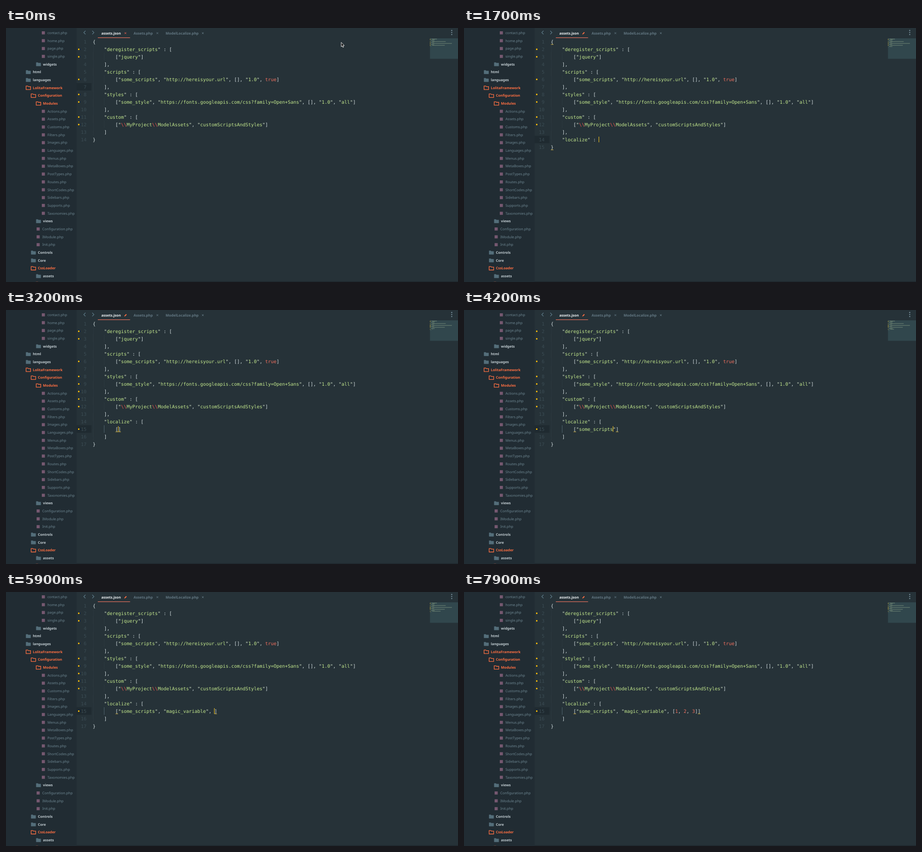
An HTML page that plays this animation: 960 by 540 pixels, repeating every 8000 ms.

```html
<!DOCTYPE html>
<html lang="en">
<head>
<meta charset="utf-8">
<title>Editor</title>
<style>
html, body { margin: 0; width: 100%; height: 100%; overflow: hidden; background: #263238; }
svg { display: block; width: 960px; height: 540px; }
text { white-space: pre; text-rendering: geometricPrecision; }
.ui { font: 500 7.5px "Noto Sans", "Open Sans", sans-serif; fill: #6d8691; }
.bold { font-weight: 700; font-size: 7.4px; }
.folder { fill: #c3ced3; }
.open { fill: #ff7043; }
.code { font: 9.97px "DejaVu Sans Mono", monospace; fill: #d5e0e2; }
.num { fill: #3b4c54; text-anchor: end; }
.q { fill: #d9e8d0; }
.s { fill: #c3e88d; }
.e { fill: #f0574f; }
.n { fill: #f2705f; }
</style>
</head>
<body>
<svg viewBox="0 0 960 540">
  <rect width="960" height="540" fill="#263238"/>
  <rect width="150" height="540" fill="#212c33"/>
  <rect x="150" y="538" width="810" height="2" fill="#202a30"/>
  <g id="side"></g>
  <g id="tabs"></g>
  <g id="map"></g>
  <g id="page"></g>
  <rect id="caret" width="1" height="12" fill="#ffcc22"/>
  <path id="mouse" d="M712 30.5v9.3l2.1-1.9 1.4 3.3 1.6-.7-1.4-3.2h2.8z" fill="#111" stroke="#fff" stroke-width=".9"/>
</svg>
<script>
const LOOP = 8000, CW = 6.002, X0 = 184.3, TOP = 21, LH = 16;
const $ = id => document.getElementById(id);
const rect = (x, y, w, h, fill) => `<rect x="${x}" y="${y}" width="${w}" height="${h}" fill="${fill}"/>`;
const text = (x, y, cls, str) => `<text x="${x}" y="${y}" class="${cls}">${str}</text>`;
const line = (d, color, w = 1) => `<path d="${d}" fill="none" stroke="${color}" stroke-width="${w}"/>`;

// Sidebar: depth digit, kind (f file, d folder, o open folder), label
const tree = `4f contact|4f home|4f page|4f single|2d widgets|0d html|0d languages|0o LolitaFramework
|1o Configuration|2o Modules|3f Actions|3f Assets|3f Customs|3f Filters|3f Images|3f Languages|3f Menus
|3f MetaBoxes|3f PostTypes|3f Routes|3f ShortCodes|3f Sidebars|3f Supports|3f Taxonomies|2d views
|2f Configuration|2f IModule|2f Init|1d Controls|1d Core|1o CssLoader|2d assets|2o classes`
  .replace(/\n/g, '').split('|');

function treeRow(item, i) {
  const depth = +item[0], kind = item[1], name = item.slice(3), y = 10 + 16.68 * i;
  if (kind === 'f') {
    const x = depth === 2 ? 77 : 88;
    return rect(x - 12, y - 3, 6.6, 6.6, '#755870') + text(x, y + 2.9, 'ui', name + '.php');
  }
  const x = 42 + 10.8 * depth, open = kind === 'o';
  const shape = `M${x + .6} ${y - 3.3}h3.6l1.2 1.2h4.8v6.2h-9.6z`;
  const icon = open ? line(shape, '#ff7043', 1.3)
    : `<path d="${shape}" fill="#546e7a" stroke="#546e7a" stroke-width=".7"/>`;
  return icon + text(x + 15, y + 3, 'ui bold ' + (open ? 'open' : 'folder'), name);
}
$('side').innerHTML = tree.map(treeRow).join('');

const cross = (x, color) => line(`M${x - 1.8} 9.2l3.6 3.6m0-3.6l-3.6 3.6`, color, 1);
function drawTabs(dirty) {
  const tab = (x, name, color) =>
    `<text x="${x}" y="13.5" class="ui bold" style="fill:${color};font-size:7.55px">${name}</text>`;
  const mark = dirty
    ? '<path d="M251.2 13.8l.5-1.9 3.3-3.3 1.4 1.4-3.3 3.3z" fill="#ff7043"/>'
    : cross(253.6, '#f0604f');
  $('tabs').innerHTML = line('M168.8 6l-3.6 3.7 3.6 3.7M183.2 6l3.6 3.7-3.6 3.7', '#607d8b', 1.2)
    + tab(202.5, 'assets.json', '#eef3f4') + mark
    + tab(271, 'Assets.php', '#637883') + cross(321.5, '#637883')
    + tab(339, 'ModelLocalize.php', '#637883') + cross(418, '#637883')
    + rect(195, 20, 68.5, 1.2, '#e5705c')
    + [5.3, 9.6, 13.9].map(y => `<circle cx="946.7" cy="${y}" r="1.2" fill="#78909c"/>`).join('');
}

// Editing session
let doc = String.raw`{
    "deregister_scripts" : [
        ["jquery"]
    ],
    "scripts" : [
        ["some_scripts", "http://hereisyour.url", [], "1.0", true]
    ],
    "styles" : [
        ["some_style", "https://fonts.googleapis.com/css?family=Open+Sans", [], "1.0", "all"]
    ],
    "custom" : [
        ["\\MyProject\\ModelAssets", "customScriptsAndStyles"]
    ]
}`;
let pos = 0;
const steps = [];
const push = t => steps.push({ t, doc, pos });
function goto(t, n) {
  const rows = doc.split('\n');
  pos = rows.slice(0, n - 1).join('\n').length + 1 + Math.min(6, rows[n - 1].length);
  push(t);
}
function key(t, str, move = str.length) {
  doc = doc.slice(0, pos) + str + doc.slice(pos);
  pos += move;
  push(t);
}
const type = (t, gap, str) => [...str].forEach((c, i) => key(t + gap * i, c));
const pair = (t, str) => key(t, str, 1);
const skip = t => key(t, '', 1);

goto(0, 7);
for (let n = 8; n <= 13; n++) goto(200 + (n - 8) * 50, n);
key(550, ',');
key(700, '\n    ');
pair(800, '""');
type(850, 60, 'localize');
skip(1350);
type(1450, 100, ' : ');
pair(2000, '[]');
key(2400, '\n        \n    ', 9);
pair(3000, '[]');
pair(3300, '""');
type(3380, 65, 'some_scripts');
skip(4270);
type(4350, 70, ', ');
pair(4490, '""');
type(4560, 70, 'magic');
type(5040, 55, '_variable');
skip(5580);
type(5650, 100, ', ');
pair(6150, '[]');
key(6400, '1');
type(6600, 100, ', ');
key(6850, '2');
type(7000, 100, ', ');
key(7250, '3');
skip(7400);

const blinkOff = [[0, 200], [2600, 2850], [4950, 5040], [7800, 8000]];

const span = (cls, str) => `<tspan class="${cls}">${str}</tspan>`;
const paint = row => row.replace(/"([^"]*)"|true|\d/g, (all, body) => {
  if (body === undefined) return span('n', all);
  const inner = body.split(/(\\+)/).map(p => p && span(p[0] === '\\' ? 'e' : 's', p)).join('');
  return span('q', '"') + inner + span('q', '"');
});

// Positions of the bracket pair around the caret
function enclosing(src, at) {
  const scan = (i, dir, up, down) => {
    for (let depth = 0; i >= 0 && i < src.length; i += dir) {
      if (up.includes(src[i])) depth++;
      else if (down.includes(src[i]) && depth-- === 0) return i;
    }
  };
  return [scan(at - 1, -1, ']}', '[{'), scan(at, 1, '[{', ']}')];
}
function place(src, at) {
  const rows = src.slice(0, at).split('\n');
  return { row: rows.length - 1, col: rows.at(-1).length };
}
const colX = col => X0 + col * CW;
const indent = row => row.search(/\S|$/);

function drawPage(step, linted) {
  const rows = step.doc.split('\n'), here = place(step.doc, step.pos);
  const marks = [2, 3, 6, 8, 9, 11, 12].concat(linted ? [10, 15] : []);
  let out = rect(150, TOP + LH * here.row, 31.5, LH, '#1f2a30');
  let map = rect(900.5, 22, 59.5, 43.5, '#31474d');
  rows.forEach((row, i) => {
    const y = TOP + LH * i, pad = indent(row), mapY = 21.8 + 1.333 * i;
    for (let c = 0; c < pad; c += 4) {
      const active = c === 4 && i === here.row;
      const x = Math.round(colX(c)) + (c ? .5 : 1.5);
      out += active ? line(`M${x} ${y}v${LH}`, '#4c626b')
        : `<path d="M${x} ${y}v${LH}" stroke="#303e45" stroke-dasharray="1 1"/>`;
    }
    out += text(171, y + 11.7, 'code num', i + 1) + text(X0, y + 11.7, 'code', paint(row));
    map += rect(901.5 + pad * .49, mapY, (row.length - pad) * .49, .8, '#7f967f');
    if (marks.includes(i + 1)) {
      out += `<rect x="153" y="${y + 6.7}" width="3" height="3" rx=".8" fill="#ffc107"/>`;
      map += rect(900.5, mapY, 1, 1.2, '#c5a83a');
    }
  });
  if (step.t > 0) enclosing(step.doc, step.pos).forEach(at => {
    const p = place(step.doc, at);
    out += rect(colX(p.col) + .3, TOP + LH * p.row + 13.5, 5.4, 1, '#d9b53f');
  });
  $('page').innerHTML = out;
  $('map').innerHTML = map;
  $('caret').setAttribute('x', Math.round(colX(here.col) - .8));
  $('caret').setAttribute('y', TOP + LH * here.row + 2);
}

let shown = '';
function frame(now) {
  const t = now % LOOP;
  const i = steps.findLastIndex(s => s.t <= t), linted = t >= 2800;
  const id = i + ':' + linted;
  if (id !== shown) {
    shown = id;
    drawPage(steps[i], linted);
    drawTabs(t >= 550);
  }
  const hidden = blinkOff.some(([a, b]) => t >= a && t < b);
  $('caret').style.display = hidden ? 'none' : '';
  $('mouse').style.display = t < 550 ? '' : 'none';
}
const start = performance.now();
function tick() {
  frame(performance.now() - start);
  requestAnimationFrame(tick);
}
tick();
</script>
</body>
</html>
```
